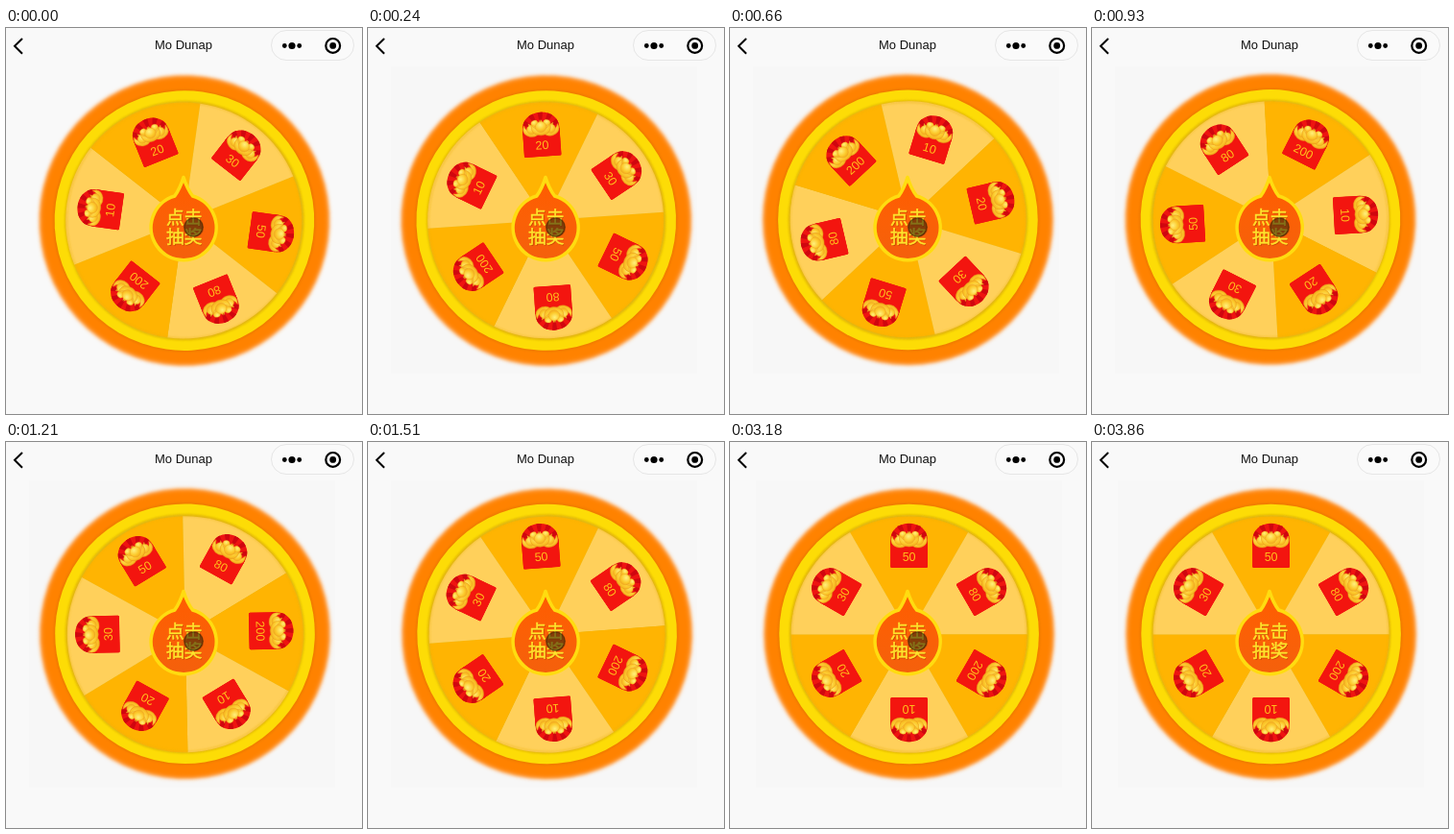
Write an HTML page that moves like this. It is 371x402 px and loops after 4.8 s.

```html
<!DOCTYPE html>
<html lang="zh">
<head>
<meta charset="utf-8">
<title>Prize wheel</title>
<style>
html, body { margin: 0; width: 100%; height: 100%; overflow: hidden; background: #f9f9f9; }
svg { display: block; width: 371px; height: 402px; }
text { text-anchor: middle; }
.bar { font: 13px "Liberation Sans", Arial, sans-serif; fill: #111; }
.cjk { font-family: "Noto Sans CJK SC", "Noto Sans CJK", sans-serif; }
.sum { font: 12.5px "Liberation Sans", Arial, sans-serif; fill: #ffbf1c; }
</style>
</head>
<body>
<svg viewBox="0 0 371 402" xmlns="http://www.w3.org/2000/svg">
  <defs>
    <filter id="soft" x="-10%" y="-10%" width="120%" height="120%"><feGaussianBlur stdDeviation="2.2"/></filter>
    <filter id="fine" x="-10%" y="-10%" width="120%" height="120%"><feGaussianBlur stdDeviation="1"/></filter>
    <linearGradient id="drop" x1="0" y1="0" x2="0" y2="1">
      <stop offset="0" stop-color="#ff5c00"/><stop offset=".5" stop-color="#fb6006"/><stop offset="1" stop-color="#f4600c"/>
    </linearGradient>
    <radialGradient id="gold" cx=".45" cy=".3" r=".75">
      <stop offset="0" stop-color="#fff07c"/><stop offset=".6" stop-color="#fcc92c"/><stop offset="1" stop-color="#f0a31a"/>
    </radialGradient>
    <clipPath id="packet">
      <path d="M-19.3-69Q-19.3-67.5-17.8-67.5H17.8Q19.3-67.5 19.3-69V-96.5C19.3-107.5 10-113.8 0-113.8S-19.3-107.5-19.3-96.5Z"/>
    </clipPath>
    <g id="ingot">
      <path d="M-8-4Q-5 1 0 1T8-4Q9.5 5 0 5.6Q-9.5 5-8-4Z" fill="url(#gold)" stroke="#e8981a" stroke-width=".4"/>
      <ellipse cy="-1.4" rx="4.6" ry="4.4" fill="url(#gold)" stroke="#f0a824" stroke-width=".4"/>
    </g>
    <g id="envelope">
      <g clip-path="url(#packet)">
        <rect x="-20" y="-115" width="40" height="48" fill="#ee1411"/>
        <g id="rays"></g>
        <path d="M-20-96.5Q0-83 20-96.5V-66H-20Z" fill="#f3150f"/>
      </g>
      <g id="pile"></g>
    </g>
  </defs>

  <rect width="371" height="402" fill="#f9f9f9"/>
  <rect id="panel" y="40" width="319" height="320" fill="#f7f7f7"/>

  <path d="M17 11L9 18.8L17 26.8" fill="none" stroke="#000" stroke-width="2"/>
  <text class="bar" x="185" y="22">Mo Dunap</text>
  <rect x="276.5" y="2.5" width="86" height="31" rx="15.5" fill="#fafafa" stroke="#e6e6e6"/>
  <circle cx="290.3" cy="18.5" r="2.4"/><circle cx="298" cy="18.5" r="3.6"/><circle cx="305.7" cy="18.5" r="2.4"/>
  <circle cx="340.7" cy="18.4" r="7.4" fill="none" stroke="#000" stroke-width="2.2"/>
  <circle cx="340.7" cy="18.4" r="3.4"/>

  <g id="wheel">
    <circle r="151" fill="#ff9a3c" filter="url(#soft)"/>
    <circle r="149.3" fill="#ff8205" filter="url(#soft)"/>
    <circle r="135.5" fill="none" stroke="#e87800" stroke-width="2" filter="url(#fine)"/>
    <circle r="135.3" fill="#fddc06"/>
    <circle r="124.6" fill="#dfb80c" filter="url(#fine)"/>
    <g id="sectors" transform="translate(0 .6)"></g>
    <circle r="123" fill="none" stroke="#e9b010" stroke-width="1.6" opacity=".55" filter="url(#fine)"/>
    <g id="prizes" transform="translate(0 -1.4)"></g>
  </g>

  <path d="M185 155.5Q188.5 167 194.5 175A34 34 0 1 1 175.8 175Q181.5 167 185 155.5Z" fill="url(#drop)" stroke="#ffdc10" stroke-width="3.6" stroke-linejoin="round"/>
  <g class="cjk" font-size="18.7" font-weight="500" stroke-width=".5">
    <g fill="#a83400" opacity=".6" transform="translate(.8 1)"><text x="185.8" y="204">点击</text><text x="185.8" y="223.5">抽奖</text></g>
    <g fill="#ffe42c" stroke="#ffe42c"><text x="185.8" y="204">点击</text><text x="185.8" y="223.5">抽奖</text></g>
  </g>
  <circle id="press" cx="195.5" cy="207.5" r="9.8" fill="#33260c" fill-opacity=".6" stroke="#2a1c00" stroke-opacity=".45" stroke-width="1.5"/>

  <g id="toast">
    <rect x="116" y="290" width="138" height="40" rx="4" fill="#111" fill-opacity=".68"/>
    <text class="cjk" x="185" y="314" font-size="13" fill="#fff" stroke="#fff" stroke-width=".3">恭喜你获得3等奖</text>
  </g>
</svg>
<script>
const $ = id => document.getElementById(id);
const LOOP = 4800, TOAST_ON = 1750, TOAST_OFF = 3180, RELEASE = 3860;
const ticks = [0, 120, 240, 390, 510, 660, 780, 930, 1060, 1210, 1360, 1510, 1630, 1750];

// time, angle, speed in degrees per ms
const spin = [
  [0, 98, .03], [390, 137.7, .17], [930, 266.8, .25], [1210, 328.8, .135], [1700, 360, 0]
];

function polar(r, deg) {
  const a = deg * Math.PI / 180;
  return (r * Math.sin(a)).toFixed(2) + ' ' + (-r * Math.cos(a)).toFixed(2);
}

function wedge(r, from, to, fill) {
  return `<path d="M0 0L${polar(r, from)}A${r} ${r} 0 0 1 ${polar(r, to)}Z" fill="${fill}"/>`;
}

function build() {
  let rays = '', sectors = '', prizes = '';
  for (let a = -97; a < 95; a += 30) rays += wedge(26, a, a + 15, '#d0060f');
  $('rays').innerHTML = `<g transform="translate(0 -93.5)">${rays}</g>`;

  const pile = [
    [-6, -101, .8, -15], [6, -101, .8, 15],
    [-10.5, -94.5, 1.05, 14], [10.5, -94.5, 1.05, -14], [0, -96.5, 1.25, 0]
  ];
  $('pile').innerHTML = pile.map(([x, y, s, r]) =>
    `<use href="#ingot" transform="translate(${x} ${y}) rotate(${r}) scale(${s})"/>`).join('');

  [50, 80, 200, 10, 20, 30].forEach((sum, i) => {
    const a = i * 60;
    sectors += wedge(123, a - 30, a + 30, i % 2 ? '#ffd05b' : '#ffb402');
    prizes += `<g transform="rotate(${a})"><use href="#envelope"/><text class="sum" y="-75">${sum}</text></g>`;
  });
  $('sectors').innerHTML = sectors;
  $('prizes').innerHTML = prizes;
}

// cubic Hermite between the key poses
function angleAt(t) {
  const i = spin.findIndex(k => k[0] > t);
  if (i < 0) return 360;
  const [t0, a0, v0] = spin[i - 1], [t1, a1, v1] = spin[i];
  const d = t1 - t0, u = (t - t0) / d, w = 1 - u;
  return a0 * w * w * (1 + 2 * u) + a1 * u * u * (3 - 2 * u) + d * u * w * (v0 * w - v1 * u);
}

const show = (id, on) => $(id).setAttribute('visibility', on ? 'visible' : 'hidden');

function draw(t) {
  const tick = ticks.filter(k => k <= t).pop();
  $('wheel').setAttribute('transform', `translate(186 200) rotate(${angleAt(tick).toFixed(3)}) translate(.6 0)`);
  $('panel').setAttribute('x', t < TOAST_ON ? 24 : 27);
  show('panel', t >= 120);
  show('toast', t >= TOAST_ON && t < TOAST_OFF);
  show('press', t < RELEASE);
}

build();
draw(0);
const start = performance.now();
function loop() {
  draw((performance.now() - start) % LOOP);
  requestAnimationFrame(loop);
}
requestAnimationFrame(loop);
</script>
</body>
</html>
```
